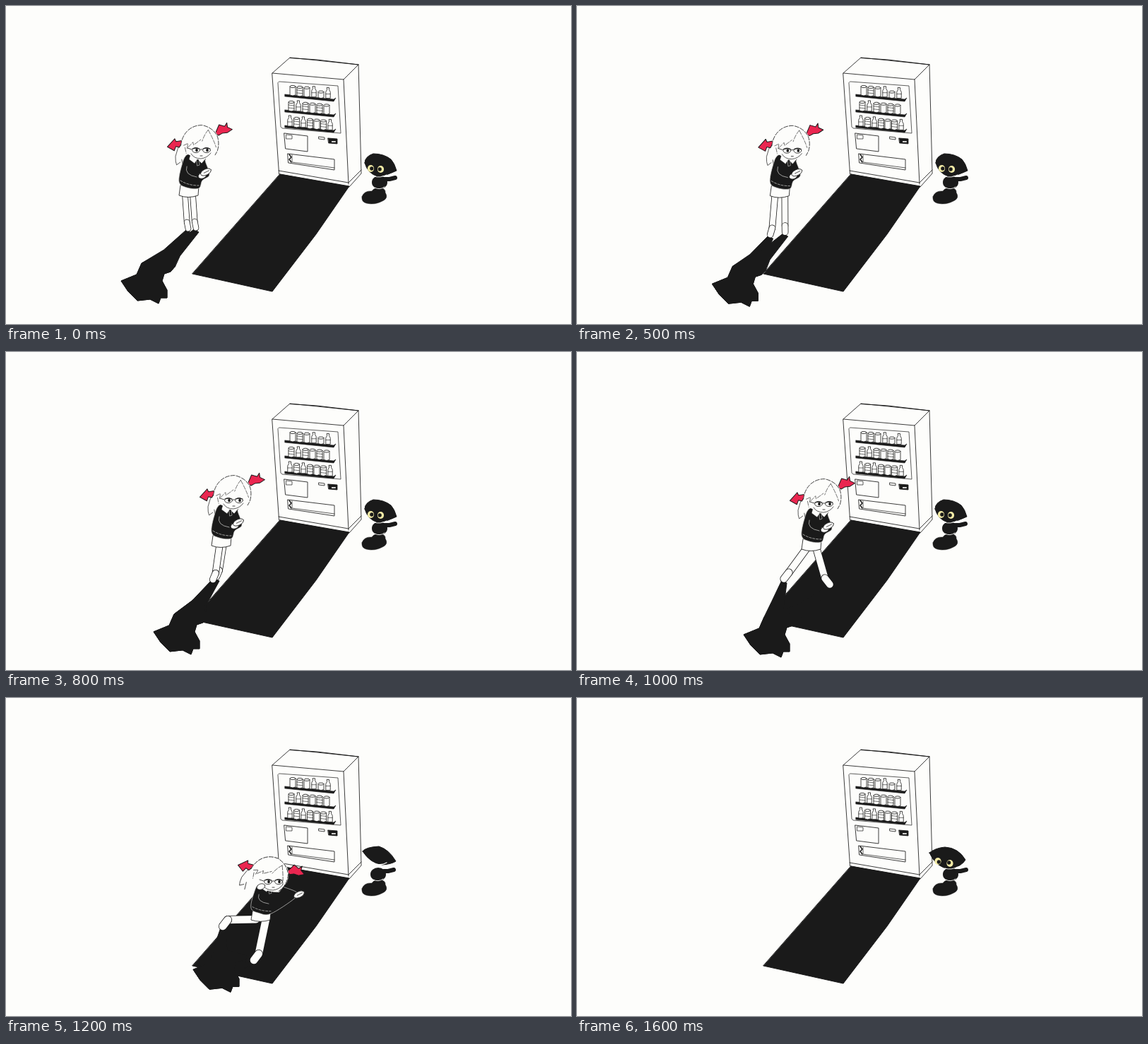
These frames come from a looping animation (800 by 450 pixels, 1700 ms). An HTML page with a canvas:

```html
<!DOCTYPE html>
<html lang="en">
<head>
<meta charset="utf-8">
<title>Vending machine</title>
<style>
  html, body { margin: 0; width: 100%; height: 100%; overflow: hidden; background: #fdfdfb; }
  canvas { display: block; width: 800px; height: 450px; }
</style>
</head>
<body>
<canvas id="stage" width="800" height="450"></canvas>
<script>
const ctx = document.getElementById('stage').getContext('2d');
const LOOP = 1700, TICK = 100;
const FALL = 1200, GONE = 1600;
const HOLDS = { 400: 300, 1300: 1200 };
const PAPER = '#fdfdfb', INK = '#1a1a1a', RED = '#ea2650', YELLOW = '#f3eba6', SEAM = '#d8d8d6';

const PIT = 'M388 238 L486 255 L439 323 L377 404 L264 379 Z';

// Walk: time, head, then the toes of both feet.
const WALK = [
  { t: 0, head: [274, 185], toes: [[258, 315], [269, 314]] },
  { t: 300, head: [291, 181], toes: [[271, 314], [298, 316]] },
  { t: 600, head: [308, 188], toes: [[275, 328], [293, 322]] },
  { t: 800, head: [320, 191], toes: [[298, 318], [293, 322]] },
  { t: 1000, head: [347, 196], toes: [[358, 329], [293, 321]] },
  { t: 1200, head: [376, 241], toes: [[351, 371], [307, 323]] }
];

const clamp = (v, lo, hi) => Math.min(hi, Math.max(lo, v));
const mix = (a, b, k) => a.map((v, i) => v + (b[i] - v) * k);

function poseAt(t) {
  const i = clamp(WALK.findIndex(p => p.t > t), -1, WALK.length);
  const b = i < 0 ? WALK[WALK.length - 1] : WALK[i];
  const a = i < 0 ? b : WALK[i - 1];
  const k = a === b ? 0 : (t - a.t) / (b.t - a.t);
  return {
    head: mix(a.head, b.head, k),
    toes: a.toes.map((toe, n) => mix(toe, b.toes[n], k)),
    reach: clamp((t - 1000) / 200, 0, 1)
  };
}

function fill(color) { ctx.fillStyle = color; ctx.fill(); }
function stroke(width = 0.85, color = INK) {
  ctx.lineWidth = width;
  ctx.strokeStyle = color;
  ctx.stroke();
}
function paint(color, width, edge) { fill(color); stroke(width, edge); }

function trace(points, close) {
  ctx.beginPath();
  points.forEach(p => ctx.lineTo(...p));
  if (close) ctx.closePath();
}

// Closed smooth curve through all the points.
function blob(p) {
  const at = i => p[(i + p.length) % p.length];
  const pull = (i, sign) => at(i).map((v, d) => v + sign * (at(i + 1)[d] - at(i - 1)[d]) / 6);
  ctx.beginPath();
  ctx.moveTo(...p[0]);
  p.forEach((_, i) => ctx.bezierCurveTo(...pull(i, 1), ...pull(i + 1, -1), ...at(i + 1)));
}

function oval(x, y, rx, ry, turn = 0) {
  ctx.beginPath();
  ctx.ellipse(x, y, rx, ry, turn, 0, Math.PI * 2);
}

function line(d, width = 0.85, color = INK) {
  ctx.lineWidth = width;
  ctx.strokeStyle = color;
  ctx.stroke(new Path2D(d));
}

function shape(d, color = PAPER, width = 0.85, edge = INK) {
  ctx.fillStyle = color;
  ctx.fill(new Path2D(d));
  line(d, width, edge);
}

function placed([x, y], turn, part) {
  ctx.save();
  ctx.translate(x, y);
  ctx.rotate(turn);
  part();
  ctx.restore();
}

function drink(kind, x, base) {
  placed([x, base], 0, () => {
    if (kind === 'b') {
      shape('M-1.5 -15 H1.5 V-12 L3.2 -9 V0 H-3.2 V-9 L-1.5 -12 Z', PAPER, 0.8);
      line('M-3.2 -6 H3.2', 0.6);
      return;
    }
    const top = kind === 's' ? -8 : -12;
    shape(`M-4 ${top} V0 L0 1 L4 0 V${top}`, PAPER, 0.8);
    oval(0, top, 4, 1.6);
    paint(PAPER, 0.8);
    if (kind === 'l') line(`M-4 ${top + 4} L4 ${top + 5} M-4 -4 L4 -3`, 0.6);
  });
}

function machine() {
  shape('M377 95 L402 73 L499 83 L503 237 L486 256 L387 238 Z');
  line('M377 95 L478 104 L499 83 M478 104 L485 252 M386 233 L485 250 L503 232');
  line('M402 73.5 L440 76 L499 83', 1.2);
  shape('M387 107 L470 113 L474 180 L391 173 L389 171 L385 109 Z', PAPER, 0.7);

  ['clcbsb', 'lblclc', 'blblclb'].forEach((row, r) => {
    const y = 126 + r * 22;
    shape(`M395 ${y - 1} L464 ${y + 6} L467 ${y + 4} L464 ${y + 9} L395 ${y + 2} Z`, INK, 0.6);
    const gap = (r === 2 ? 57 : 50) / (row.length - 1);
    [...row].forEach((kind, i) => drink(kind, 406 - r * 2 + i * gap, y + i * 0.9));
  });

  shape('M394 180 L427 184 V206 L396 202 Z');
  shape('M397 182 L405 183 V188 H397 Z', PAPER, 0.7);
  shape('M443 185 L451 186 V189 L443 188 Z', PAPER, 0.8);
  shape('M456 187 L469 188 V195 L457 194 Z', INK, 0.8);
  shape('M461 191 H467 V193 H461 Z', PAPER, 0.4);
  shape('M399 209 L465 217 V232 L400 222 Z');
  line('M405 211 V221 L465 229', 0.7);
  line('M401 210 L404 214 L401 217 L404 221', 1.5);
  shape(PIT, INK, 1);
}

function eye(x, y, look) {
  oval(x, y, 4.6, 5);
  fill(YELLOW);
  oval(x + look[0], y + look[1], 2.6, 2.7);
  fill(INK);
}

function cat(t) {
  const blink = t === 600 || t === FALL, late = t > FALL;
  const dx = late ? 0 : t >= FALL ? -2 : t >= 900 ? -1 : 0;
  shape('M504 270 Q507 261 518 262 Q521 257 530 257 Q538 259 537 264 Q542 272 533 276 Q522 282 510 279 Q503 277 504 270 Z', INK, 0.5);
  placed([dx, 0], 0, () => {
    oval(529, 249.5, 11, 9.5);
    fill(INK);
    line('M537 245 L543 245 L551 243', 6);
    line('M522 257 Q529 261 536 256', 0.9, PAPER);
    if (blink) {
      shape('M507 217 Q511 211 530 210 Q544 214 554 231 Q548 235 535 236 Q518 234 507 217 Z', INK, 1);
      line('M512 228 Q516 233 522 233 M527 235 Q534 237 541 233', 1.3, PAPER);
    } else if (late) {
      shape('M499 219 Q508 212 521 211 Q540 212 550 229 Q545 238 528 242 Q508 240 499 219 Z', INK, 1);
      eye(511, 231, [1.3, 1]);
      eye(528, 234, [-1.3, -1]);
    } else {
      shape('M508 222 Q508 213 520 209 Q535 209 545 217 Q550 222 553 233 Q540 240 526 241 Q512 237 508 222 Z', INK, 1);
      eye(516.5, 230, [1.3, 0]);
      eye(530.5, 231, [-1.3, 0]);
    }
    if (!blink) line('M521 241 Q530 244 539 239', 0.9, PAPER);
  });
}

function leg(hip, toe, w) {
  const ankle = [toe[0] - clamp((toe[0] - hip[0]) * 0.4, -7, 7), toe[1] - 9];
  [[hip, ankle], [ankle, toe]].forEach(part => {
    trace(part);
    stroke(w + 1.6);
    stroke(w, PAPER);
  });
}

// Ragged upper body lying on the ground, joined to each foot.
function shade({ head: [x], toes, reach }) {
  const cx = x - 75, cy = 393 + (x - 274) * 0.15 - reach * 20;
  const ragged = [[40, -24], [34, -17], [25, -14], [22, -4], [29, 9], [29, 20], [20, 20], [17, 28],
    [5, 22], [-13, 24], [-26, 11], [-36, -4], [-14, -13], [-7, -29]]
    .map(([px, py]) => [cx + px, cy + py]);
  for (const toe of toes) {
    const [hx, hy] = mix([cx, cy], toe, 0.55);
    trace([...ragged, [hx - 8, hy - 5], [toe[0] - 3, toe[1] + 2], [toe[0] + 4, toe[1] + 6], [hx + 9, hy + 4]], true);
    paint(INK, 1);
  }
}

function backHair() {
  shape('M-24 4 Q-32 18 -33 30 L-31 41 L-25 37 L-21 44 L-8 20 Z', PAPER, 0.1, PAPER);
  line('M-26 8 Q-31 18 -33 29 Q-33 37 -31 41 L-26 37 M-24 33 L-22 43', 0.7);
}

function frontHair() {
  shape('M-26 12 Q-24 -16 2 -17 Q27 -14 28 9 L24 26 Q12 32 2 31 Q-12 29 -20 22 Z', PAPER, 0.1, PAPER);
  ctx.setLineDash([6, 2]);
  line('M-26 13 Q-25 1 -18 -7 Q-10 -16 3 -16.5 Q18 -14 25 -2 Q29 8 26 19 L23 25', 0.8);
  line('M-22 13 L-16 10 L-17 17 L-9 8 L-8 12 L2 4 M12 -10 Q7 -4 4 6 M12 -10 Q18 0 22 9 L24 14 M-20 16 L-18 24', 0.6);
  ctx.setLineDash([]);
}

function face() {
  line('M-12 24 Q-8 31 2 31 Q11 30 16 23', 0.7);
  for (const x of [-5, 10]) {
    oval(x, 19, 5.4, 3.6);
    stroke(0.8);
    line(`M${x - 5} 17 L${x} 16 L${x + 5} 17`, 1.2);
    oval(x + 1, 19, 1.8, 2.2);
    fill(INK);
  }
  line('M1 18 H4 M-11 18 L-17 16 M1 27 H4', 0.8);
}

function jacket(reach) {
  const body = [[-17, 25], [-25, 40], [-29, 64], [-18, 72], [-1, 73],
    [4 + 28 * reach, 62 - 13 * reach], [14 + 22 * reach, 54 - 15 * reach], [9 + 8 * reach, 37 - 7 * reach], [4, 25]];
  blob(body);
  paint(INK, 0.7, SEAM);
  line('M-18 42 Q-22 54 -4 57', 0.7, SEAM);
  ctx.setLineDash([3, 2]);
  line('M-27 62 Q-16 69 -1 69', 0.7, SEAM);
  ctx.setLineDash([]);
}

function girl(pose, withShade) {
  const { head, toes, reach } = pose, [x, y] = head;
  const turn = (2 + 23 * reach) * Math.PI / 180;
  const squash = 1 - 0.12 * reach;
  if (withShade) shade(pose);

  const spread = clamp((toes[0][0] - toes[1][0]) / 2, -7, 7);
  [1, -1].forEach((side, n) => {
    leg([x - 15 + side * spread, y + 82 * squash], toes[n], 7 + (x - 274) * 0.035);
  });
  placed(head, turn, backHair);
  placed(head, 0, () => {
    ctx.scale(1, squash);
    shape('M-27 69 L-29 83 Q-16 88 -2 83 L-1 70 Z');
    jacket(reach);
    shape('M-13 25 L-15 32 L-7 38 L-3 32 L3 38 L9 31 L8 25 Z', PAPER, 0.7);
    shape('M-4 32 H-1 L0 40 L-3 41 Z', INK, 0.5, PAPER);
  });
  placed(head, turn, () => {
    placed([34, -12], 0, () => shape('M-12 7 L-7 -6 L1 -4 L4 -9 L5 -3 L12 0 L5 5 L-2 6 L-7 9 Z', RED, 1));
    placed([-34, 12], 0, () => shape('M-11 4 L-1 -8 L1 -4 L11 -6 L6 4 L1 3 L-1 9 Z', RED, 1));
    frontHair();
  });
  placed(head, 0, () => {
    face();
    oval(4 - 19 * reach, 55 - 29 * reach, 6, 4, -0.35);
    paint(PAPER, 0.8);
    placed([9 + 30 * reach, 50 - 13 * reach], -0.45, () => {
      oval(0, 0, 8, 4.2);
      paint(PAPER, 0.8);
      line('M-3 0 H5', 0.7);
    });
  });
}

function falling(t) {
  const k = (t - FALL) / 300;
  ctx.save();
  ctx.clip(new Path2D(PIT));
  ctx.translate(-14 * k * k, 128 * k * k);
  girl(poseAt(FALL), false);
  ctx.restore();
}

function render(t) {
  ctx.fillStyle = PAPER;
  ctx.fillRect(0, 0, 800, 450);
  ctx.lineCap = ctx.lineJoin = 'round';
  machine();
  cat(t);
  if (t <= FALL) girl(poseAt(t), true);
  else if (t < GONE) falling(t);
}

function tick() {
  const t = Math.floor(performance.now() % LOOP / TICK) * TICK;
  render(HOLDS[t] ?? t);
  requestAnimationFrame(tick);
}
tick();
</script>
</body>
</html>
```
